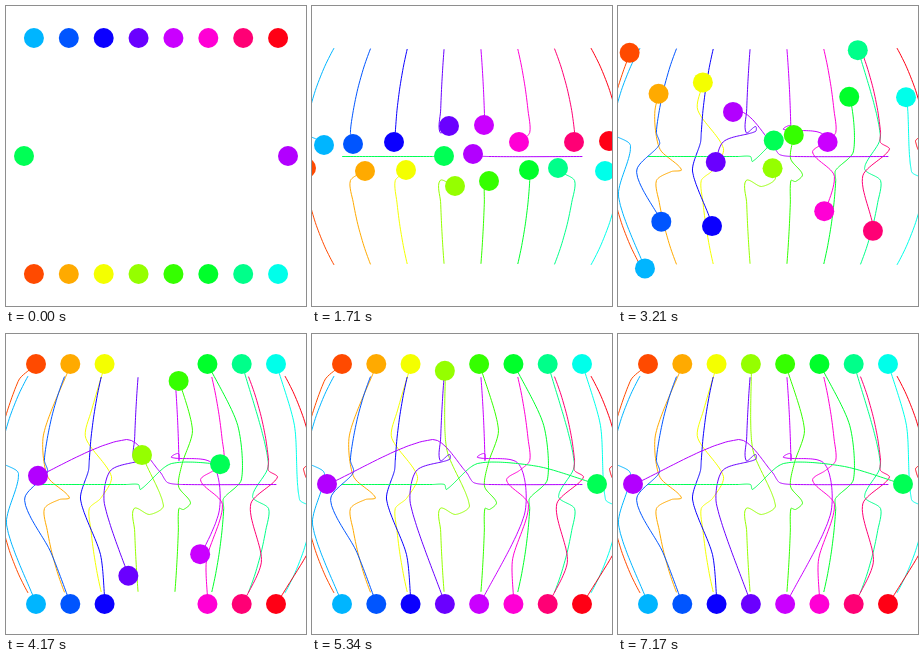
Write an HTML page with a canvas that moves like this. It is 300x300 px and loops after 7.2 s.

```html
<!DOCTYPE html>
<html lang="en">
<head>
<meta charset="utf-8">
<title>Crossing agents</title>
<style>
  html, body { margin: 0; width: 100%; height: 100%; overflow: hidden; background: #fff; }
  canvas { display: block; }
</style>
</head>
<body>
<canvas id="stage" width="300" height="300"></canvas>
<script>
const ctx = document.getElementById('stage').getContext('2d');
const SIZE = 300, MID = 150, ROW = 30, SIDE = 15, GAP = 240 / 7;
const LOOP = 7200, STEP = 30, RADIUS = 10, TRAIL_START = 4;
const MEET = 1050, GO = 1710;     // ms: agents reach the crowd, agents start to pass
const SPEED = 0.095;              // px per ms when the way is free
const agents = [];

const mix = (a, b, u) => a + (b - a) * u;

// Rows spread outwards like a barrel on their way to the middle.
function barrel(k, y) {
  const bulge = Math.sin(Math.PI * (y - ROW) / (SIZE - 2 * ROW)) ** 0.8;
  return [MID + GAP * k * (1 + 0.32 * bulge), y];
}

// Cubic curve through the points, with its running length
function curveThrough(pts) {
  const slope = i => {
    const a = pts[Math.max(i - 1, 0)], b = pts[Math.min(i + 1, pts.length - 1)];
    const d = Math.hypot(b[0] - a[0], b[1] - a[1]) || 1;
    return [(b[0] - a[0]) / d, (b[1] - a[1]) / d];
  };
  const curve = [[...pts[0], 0]], reach = [0];
  for (let i = 1; i < pts.length; i++) {
    const a = pts[i - 1], b = pts[i], sa = slope(i - 1), sb = slope(i);
    const d = Math.hypot(b[0] - a[0], b[1] - a[1]) * 0.75;
    for (let u = 0.125; u <= 1; u += 0.125) {
      const v = 1 - u, [px, py, len] = curve.at(-1);
      const [x, y] = [0, 1].map(c =>
        a[c] * v * v * (1 + 2 * u) + b[c] * u * u * (3 - 2 * u) + d * u * v * (sa[c] * v - sb[c] * u));
      curve.push([x, y, len + Math.hypot(x - px, y - py)]);
    }
    reach.push(curve.at(-1)[2]);
  }
  return { curve, reach };
}

// Distance after a slow start that costs `lag` ms against full speed
const ramp = (t, lag) => SPEED * (t < 2 * lag ? t * t / (4 * lag) : t - lag);

// Approach, then the dodge points (the first is the waiting place), then the goal
function agent(hue, approach, goal, lag, dodge) {
  const { curve, reach } = curveThrough([...approach, ...dodge, goal]);
  const met = reach[approach.length - 1], wait = reach[approach.length];
  const path = [];
  let i = 1;
  for (let t = 0; t < LOOP; t += STEP) {
    const s = t < MEET ? met * t / MEET
      : t < GO ? mix(met, wait, (t - MEET) / (GO - MEET))
      : Math.min(wait + ramp(t - GO, lag), reach.at(-1));
    while (i < curve.length - 1 && curve[i][2] < s) i++;
    const a = curve[i - 1], b = curve[i], u = (s - a[2]) / (b[2] - a[2] || 1);
    path.push([mix(a[0], b[0], u), mix(a[1], b[1], u)]);
  }
  agents.push({ color: `hsl(${hue} 100% 50%)`, path });
}

let count = 0;
function row(lag, ...dodge) {
  const k = count % 8 - 3.5, top = count >= 8;
  const flip = y => top ? y : SIZE - y;
  const approach = [2, 12, 30, 52, 74, 96].map(h => barrel(k, flip(ROW + h)));
  agent(17.5 + 22.5 * count++, approach, [MID + GAP * k, flip(SIZE - ROW)], lag, dodge);
}

function side(hue, x, meetX, lag, ...dodge) {
  agent(hue, [[x + Math.sign(MID - x) * 3, MID], [meetX, MID]], [SIZE - x, MID], lag, dodge);
}

// Bottom row, left to right
row(247, [-6, 162], [-11, 122], [12, 46]);
row(480, [53, 165], [63, 163], [41, 142], [37, 100]);
row(450, [94, 164], [105, 142], [79, 103], [85, 76]);
row(2000, [143, 180], [157, 171], [134, 114]);
row(990, [177, 175], [184, 168], [172, 152], [176, 128], [186, 95]);
row(647, [217, 164], [235, 145], [231, 90]);
row(184, [246, 162], [262, 130]);
row(721, [293, 165], [288, 91]);

// Top row, left to right
row(130, [12, 139], [0, 190]);
row(520, [41, 138], [18, 165], [44, 217]);
row(563, [82, 136], [74, 165], [94, 220]);
row(862, [137, 120], [137, 125], [104, 136], [98, 170]);
row(905, [172, 119], [165, 123], [206, 129], [212, 180]);
row(585, [207, 136], [194, 146], [216, 170], [200, 225]);
row(375, [262, 136], [271, 143], [244, 170], [255, 227]);
row(870, [297, 135], [316, 185]);

side(140, SIDE, 120, 1500, [132, 150], [134, 155], [165, 129], [226, 132]);
side(282, SIZE - SIDE, 176, 810, [161, 148], [154, 138], [120, 105]);

function draw(now) {
  const n = Math.floor(now % LOOP / STEP);
  ctx.fillStyle = '#fff';
  ctx.fillRect(0, 0, SIZE, SIZE);
  for (const { color, path } of agents) {
    ctx.strokeStyle = color;
    ctx.beginPath();
    for (const [x, y] of path.slice(TRAIL_START, n + 1)) ctx.lineTo(x + 0.5, y + 0.5);
    ctx.stroke();
  }
  for (const { color, path } of agents) {
    ctx.fillStyle = color;
    ctx.beginPath();
    ctx.arc(...path[n], RADIUS, 0, 2 * Math.PI);
    ctx.fill();
  }
}

const start = performance.now();
function tick() {
  draw(performance.now() - start);
  requestAnimationFrame(tick);
}
tick();
</script>
</body>
</html>
```
